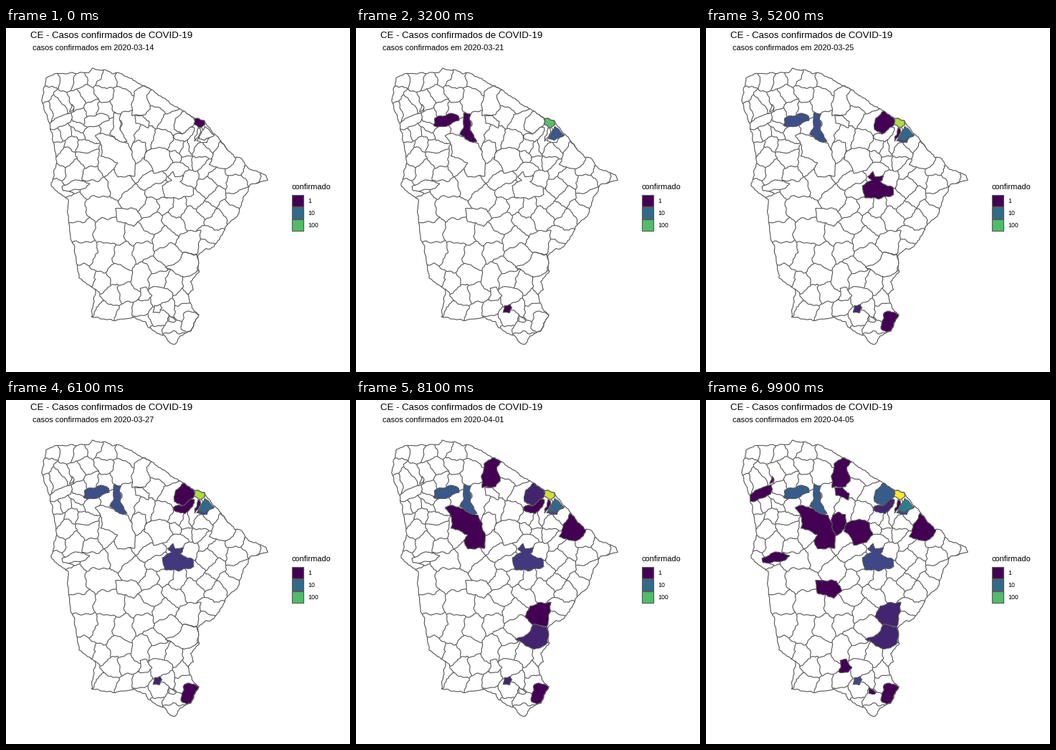
Animation, 480 px wide and 480 px high, one loop 10 s. Source, as a matplotlib script:

```python
import numpy as np
import matplotlib.pyplot as plt
from matplotlib.animation import FuncAnimation
from matplotlib.collections import LineCollection
from matplotlib.colors import LinearSegmentedColormap
from matplotlib.patches import Polygon, Rectangle
from matplotlib.path import Path

SIZE, FRAMES, INTERVAL = 480, 100, 100
FIRST_DAY, DAY_SPAN = 14, 22
MAX_CASES = 700
PX = 0.72  # points per pixel at 100 dpi
EDGE = dict(ec="#595959", lw=0.83, joinstyle="round")
SCALE = LinearSegmentedColormap.from_list(
    "cases", ["#440154", "#414487", "#2A788E", "#22A884", "#7AD151", "#FDE725"])

plt.rcParams["font.family"] = "Liberation Sans"


def pts(*nums):
    return np.array(nums, float).reshape(-1, 2)


# State border, clockwise from the north-west corner
STATE = pts(
    56, 70, 68, 64, 116, 62, 120, 57, 144, 60, 147, 63, 160, 63, 185, 77,
    203, 86, 231, 106, 264, 126, 276, 129, 290, 147, 320, 181, 327, 181,
    340, 197, 361, 204, 366, 212, 341, 219, 328, 245, 325, 259, 308, 275,
    298, 295, 284, 309, 278, 308, 268, 318, 269, 340, 258, 354, 262, 365,
    254, 371, 259, 390, 269, 400, 258, 422, 243, 430, 236, 441, 229, 440,
    224, 432, 198, 418, 195, 411, 180, 404, 149, 408, 119, 403, 125, 365,
    102, 349, 95, 305, 90, 293, 86, 255, 87, 240, 63, 221, 71, 185, 62, 138,
    50, 101)

# Areas with cases: ({frame: cases}, outline)
SOBRAL = {11: 1, 39: 3, 43: 5, 79: 6, 88: 7}
AREAS = [
    ({70: 1}, pts(125, 150, 134, 146, 170, 162, 182, 183, 179, 206, 156, 208,
                  150, 196, 156, 188, 133, 178, 134, 165)),
    (SOBRAL, pts(108, 137, 111, 125, 136, 119, 143, 122, 144, 128, 126, 138)),
    (SOBRAL, pts(150, 119, 159, 119, 160, 144, 169, 158, 163, 160, 145, 149,
                 150, 137)),
    ({97: 1}, pts(176, 160, 185, 157, 195, 160, 195, 178, 181, 190, 175, 176)),
    ({97: 1}, pts(196, 172, 212, 166, 227, 170, 232, 188, 225, 198, 207, 203,
                  201, 188, 192, 184)),
    ({79: 1}, pts(180, 88, 190, 80, 203, 86, 196, 94, 202, 113, 194, 121,
                  177, 122, 175, 110)),
    ({88: 1}, pts(180, 123, 190, 122, 200, 131, 198, 139, 181, 132)),
    ({83: 1}, pts(60, 133, 76, 123, 92, 118, 91, 131, 70, 141, 61, 141)),
    ({83: 1}, pts(92, 107, 95, 111, 93, 115, 89, 116)),
    ({88: 1}, pts(78, 222, 97, 211, 117, 217, 110, 224, 80, 228)),
    ({61: 1, 88: 2}, pts(236, 147, 246, 148, 258, 138, 264, 139, 260, 149,
                         250, 159, 233, 154)),
    ({34: 1, 79: 2, 83: 4, 88: 7}, pts(248, 116, 263, 126, 262, 135, 246, 148,
                                       234, 141, 237, 126)),
    ({52: 1}, pts(268, 139, 271, 141, 270, 150, 263, 158)),
    ({39: 2, 43: 4}, pts(270, 151, 276, 156, 283, 153, 280, 160, 266, 158)),
    ({7: 1, 25: 3, 29: 6, 43: 9, 83: 16},
     pts(278, 137, 291, 150, 276, 156, 270, 154, 272, 146)),
    ({0: 1, 7: 9, 11: 23, 21: 38, 25: 62, 29: 110, 39: 150, 43: 190, 47: 220,
      52: 320, 70: 370, 79: 440, 83: 700},
     pts(262, 133, 264, 126, 276, 129, 278, 135, 272, 140)),
    ({43: 1, 61: 3, 88: 4}, pts(226, 207, 232, 201, 236, 208, 248, 206, 243, 215,
                                261, 223, 262, 233, 241, 238, 221, 236, 218, 220,
                                231, 212)),
    ({70: 1}, pts(299, 159, 322, 181, 313, 194, 300, 197, 284, 190, 292, 170)),
    ({70: 1, 83: 2}, pts(243, 288, 254, 283, 272, 283, 267, 316, 246, 313,
                         236, 302)),
    ({79: 2}, pts(246, 313, 267, 317, 269, 330, 265, 342, 248, 348, 223, 334,
                  242, 326)),
    ({97: 1}, pts(153, 252, 182, 252, 190, 266, 178, 276, 155, 269)),
    ({97: 1}, pts(187, 363, 195, 362, 203, 373, 198, 380, 184, 380, 189, 371)),
    ({29: 1, 43: 2, 97: 4}, pts(207, 387, 214, 386, 218, 391, 214, 397, 206, 397)),
    ({88: 1}, pts(228, 401, 237, 407, 234, 411, 227, 410)),
    ({43: 1}, pts(249, 396, 262, 396, 269, 400, 258, 421, 252, 425, 244, 420)),
]


def wobble(p, fine, broad=0):
    """Bend points by a fixed field, so shared borders stay together."""
    x, y = p[:, 0], p[:, 1]
    dx = np.sin(0.42 * y + 0.13 * x) + 0.7 * np.sin(0.9 * x - 0.5 * y)
    dy = np.sin(0.38 * x - 0.17 * y) + 0.7 * np.sin(0.8 * y + 0.6 * x)
    wave = np.column_stack([np.sin(0.15 * y + 0.04 * x), np.sin(0.14 * x - 0.05 * y)])
    return p + fine * np.column_stack([dx, dy]) + broad * wave


def subdivide(a, b, step=1.5):
    n = max(2, int(np.hypot(*(b - a)) / step) + 1)
    return a + (b - a) * np.linspace(0, 1, n)[:, None]


def rough_ring(p, fine=0.6):
    sides = zip(p, np.roll(p, -1, axis=0))
    return wobble(np.vstack([subdivide(a, b)[:-1] for a, b in sides]), fine)


def spacing(p):
    """Municipalities are wide in the west, narrow in the north and south."""
    def near(x, y, radius):
        return np.exp(-((p[0] - x) ** 2 + (p[1] - y) ** 2) / radius ** 2)
    return (18.5 + 12 * near(115, 275, 60) - 9 * near(250, 170, 28)
            - 7 * near(88, 140, 50) - 5 * near(220, 395, 45))


def scatter_sites(border, rings, tries=5000):
    rng = np.random.default_rng(7)
    tested = rng.integers((48, 56), (368, 443), (tries, 2)).astype(float)
    free = Path(border).contains_points(tested)
    for ring in rings:
        free &= ~Path(ring).contains_points(tested)
    walls = np.vstack(rings)
    sites = []
    for p in tested[free]:
        gap = spacing(p)
        if np.hypot(*(walls - p).T).min() < 0.4 * gap:
            continue
        if not sites or np.hypot(*(np.array(sites) - p).T).min() > gap:
            sites.append(p)
    return np.array(sites)


def ridges(sites):
    """Edges of the Voronoi diagram, each one once."""
    norms = (sites ** 2).sum(axis=1)
    for i, a in enumerate(sites):
        for b in sites[i + 1:]:
            mid = (a + b) / 2
            along = np.array([a[1] - b[1], b[0] - a[0]])
            reach = 60 / np.hypot(*along)
            slope = 2 * (a - sites) @ along
            level = 2 * (a - sites) @ mid + norms - norms[i]
            if (level[slope == 0] < 0).any():
                continue
            up, down = slope > 0, slope < 0
            lo = np.max(-level[up] / slope[up], initial=-reach)
            hi = np.min(-level[down] / slope[down], initial=reach)
            if lo < hi:
                yield wobble(subdivide(mid + lo * along, mid + hi * along), 0.9, 2.4)


def case_color(n):
    return SCALE(np.log10(n) / np.log10(MAX_CASES)) if n else "white"


def cases_at(history, i):
    return max((n for start, n in history.items() if start <= i), default=0)


def label(x, y, text, size):
    return ax.text(x, y, text, size=size * PX, color="black", va="baseline")


def add_area(ring, color, zorder):
    area = Polygon(ring, fc=color, zorder=zorder, **EDGE)
    ax.add_patch(area)
    return area


fig = plt.figure(figsize=(SIZE / 100, SIZE / 100), dpi=100, facecolor="white")
ax = fig.add_axes([0, 0, 1, 1])
ax.set(xlim=(0, SIZE), ylim=(SIZE, 0))
ax.axis("off")

state_ring = rough_ring(STATE)
border = add_area(state_ring, "none", 4)
rings = [rough_ring(outline) for _, outline in AREAS]

inner = LineCollection(list(ridges(scatter_sites(state_ring, rings))),
                       colors=EDGE["ec"], linewidths=EDGE["lw"], zorder=1)
ax.add_collection(inner)
inner.set_clip_path(border)

areas = [(add_area(ring, "white", 2), history)
         for ring, (history, _) in zip(rings, AREAS)]
for area, _ in areas:
    area.set_clip_path(border)

label(34, 14, "CE - Casos confirmados de COVID-19", 13.2)
subtitle = label(37, 31, "", 11)
label(398.6, 225, "confirmado", 11)
for row, n in enumerate((1, 10, 100)):
    top = 232.7 + 17.28 * row
    ax.add_patch(Rectangle((399.2, top), 16, 16, fc=case_color(n), **EDGE))
    label(421.2, top + 11.2, str(n), 8.8)


def update(i):
    day = FIRST_DAY + DAY_SPAN * i // (FRAMES - 1)
    month, day = (3, day) if day <= 31 else (4, day - 31)
    subtitle.set_text(f"casos confirmados em 2020-{month:02d}-{day:02d}")
    for area, history in areas:
        area.set_facecolor(case_color(cases_at(history, i)))
    return [subtitle, *(area for area, _ in areas)]


anim = FuncAnimation(fig, update, frames=FRAMES, interval=INTERVAL,
                     repeat=True, repeat_delay=0, blit=False)
plt.show()
```
